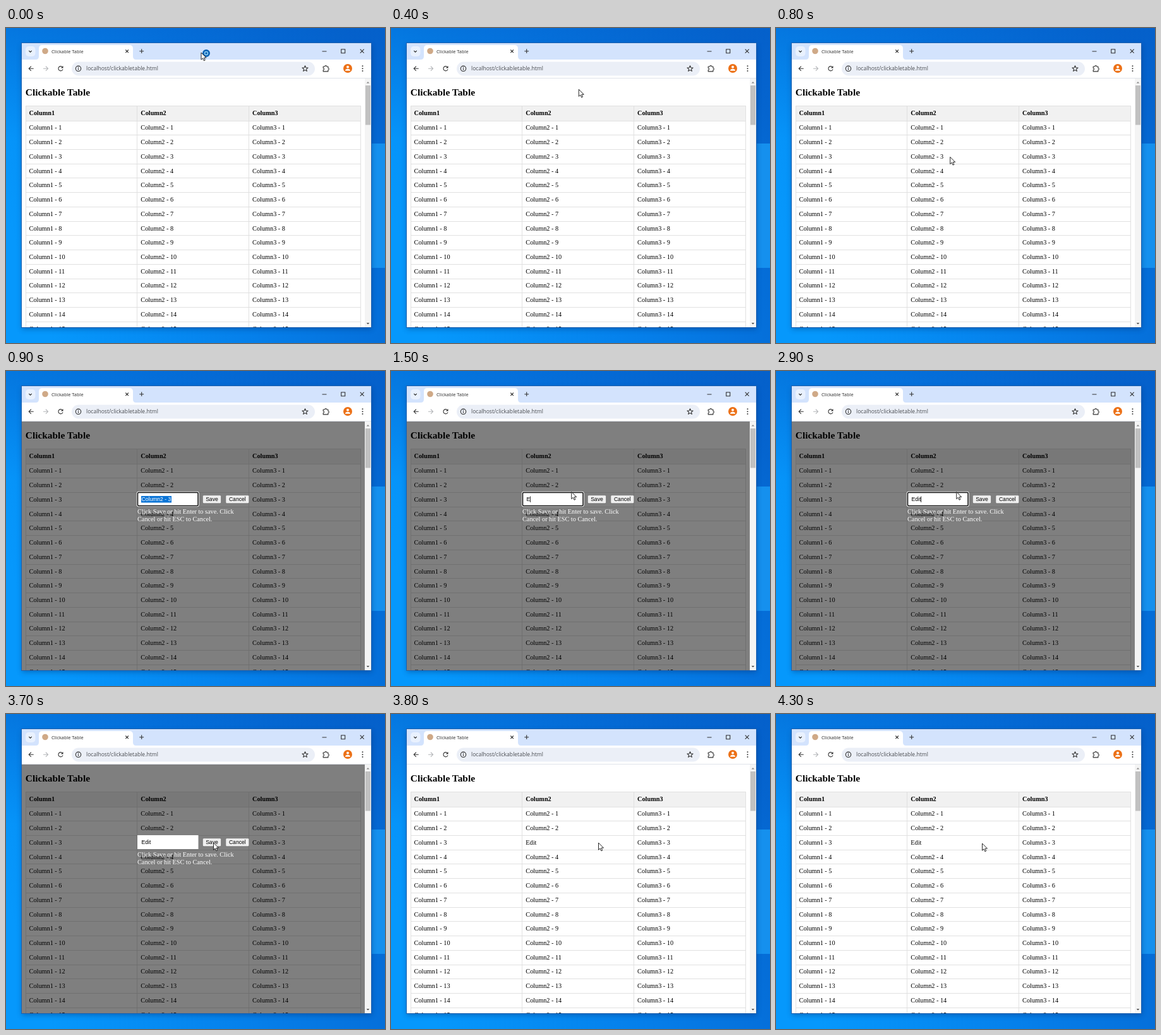
Recreate the animation shown at these times as an HTML page. Size 600 by 499 pixels, loop 4400 ms.

```html
<!DOCTYPE html>
<html lang="en">
<head>
<meta charset="utf-8">
<title>Clickable Table</title>
<style>
html, body { margin: 0; width: 100%; height: 100%; overflow: hidden; }
svg { display: block; width: 100vw; height: 100vh; }
text { white-space: pre; }
.ui { font-family: "Open Sans", sans-serif; }
.serif { font-family: "Liberation Serif", serif; font-size: 10.25px; }
.form { font-family: "Liberation Sans", sans-serif; font-size: 8.6px; }
.icon { fill: none; stroke: #333; stroke-width: 1.1; }
</style>
</head>
<body>
<svg viewBox="0 0 600 499" preserveAspectRatio="none">
  <defs>
    <linearGradient id="sky" x1="0" y1="0.6" x2="1" y2="0.3">
      <stop offset="0" stop-color="#0698fc"/>
      <stop offset="0.5" stop-color="#057fea"/>
      <stop offset="1" stop-color="#0566d0"/>
    </linearGradient>
    <linearGradient id="dim" x1="0" y1="0" x2="0" y2="1">
      <stop offset="0" stop-color="#0459c4" stop-opacity="0.45"/>
      <stop offset="0.35" stop-color="#0459c4" stop-opacity="0"/>
    </linearGradient>
    <filter id="soft" x="-10%" y="-10%" width="120%" height="120%">
      <feGaussianBlur stdDeviation="4"/>
    </filter>
    <clipPath id="view"><rect x="25" y="80" width="543" height="394"/></clipPath>
  </defs>

  <rect width="600" height="499" fill="url(#sky)"/>
  <rect width="600" height="499" fill="url(#dim)"/>
  <rect x="403" y="183" width="197" height="197" fill="#1590ee"/>
  <rect x="25" y="27" width="554" height="450" fill="#012a66" opacity="0.4" filter="url(#soft)"/>

  <!-- browser frame -->
  <rect x="24.5" y="23.5" width="554" height="451" fill="#fff" stroke="#1c5fae" stroke-width="1"/>
  <rect x="25" y="24" width="553" height="26" fill="#d3e3fd"/>
  <rect x="31" y="29" width="15.5" height="16" rx="5" fill="#e9f1fe"/>
  <path class="icon" d="M36.3 36l2.2 2.2 2.2-2.2" stroke-width="1.3"/>
  <path d="M47 50q5 0 5-5v-12.500q0-5.500 5.500-5.500h138q5.500 0 5.500 5.500V45q0 5 5 5z" fill="#fff"/>
  <circle cx="62" cy="36.500" r="4.800" fill="#cfa987"/>
  <text class="ui" x="72" y="39.600" font-size="7.400" fill="#2a2a2a">Clickable Table</text>
  <path class="icon" d="M189.300 34.500l4.600 4.600m0-4.600l-4.600 4.600M211.300 36.700h6.800m-3.400-3.400v6.800"/>
  <path class="icon" d="M500.500 37h7M530.700 33.700h6v6h-6zM560.700 33.700l6 6m0-6l-6 6"/>

  <path class="icon" d="M43.700 64.300h-7.400m3.500-3.600l-3.600 3.600 3.600 3.600" stroke-width="1.200"/>
  <path class="icon" d="M59 64.300h7.400m-3.500-3.600l3.600 3.600-3.600 3.600" style="stroke:#b3b5b8"/>
  <path class="icon" d="M89.400 62a3.600 3.600 0 1 0 .6 3.300" stroke-width="1.200"/>
  <path d="M90.500 60v3.600h-3.600z" fill="#333"/>
  <rect x="104" y="53.500" width="385" height="22" rx="11" fill="#ebeff7"/>
  <circle class="icon" cx="114.500" cy="64.300" r="4.200"/>
  <path class="icon" d="M114.500 63.700v2.900m0-4.800v1.100"/>
  <text class="ui" x="127" y="67.300" font-size="8.590" fill="#4a4d52">localhost/clickabletable.html</text>
  <path id="star" class="icon" stroke-linejoin="round"/>
  <path class="icon" d="M502.200 61h2.600a1.400 1.400 0 0 1 2.800 0h2.300v2.500a1.400 1.400 0 0 1 0 2.800v2.600h-7.700v-2.600a1.400 1.400 0 0 0 0-2.800z" stroke-linejoin="round"/>
  <circle cx="541" cy="64" r="7" fill="#ec7016"/>
  <circle cx="541" cy="61.800" r="2" fill="#fff"/>
  <path d="M537 67.700a4 3 0 0 1 8 0z" fill="#fff"/>
  <g fill="#333">
    <circle cx="564.500" cy="60.300" r="1"/><circle cx="564.500" cy="64.200" r="1"/><circle cx="564.500" cy="68.100" r="1"/>
  </g>
  <path d="M25 79.500h553" stroke="#dfe3ea"/>

  <!-- page -->
  <g clip-path="url(#view)">
    <g id="page" class="serif" fill="#000">
      <text x="30.800" y="106.700" font-size="15.400" font-weight="700" style="font-size:15.4px">Clickable Table</text>
    </g>
    <g id="dialog">
      <rect x="25" y="80" width="543" height="394" fill="#000" opacity="0.5"/>
      <rect x="208" y="192" width="96.500" height="22" fill="#fff"/>
      <g id="ring" fill="none">
        <rect x="207.300" y="191.300" width="97.900" height="23.400" rx="2" stroke="#fff" stroke-width="1"/>
        <rect x="208.500" y="192.500" width="95.500" height="21" rx="1.500" stroke="#101010" stroke-width="1.500"/>
      </g>
      <rect id="mark" x="214" y="198" width="48" height="10.500" fill="#0a74d6"/>
      <g class="form">
        <text id="field" x="214.500" y="206.200"></text>
        <rect id="caret" y="198.500" width="0.800" height="9.500"/>
        <g id="buttons"></g>
      </g>
      <g class="serif" fill="#fff">
        <text x="208" y="226.300">Click Save or hit Enter to save. Click</text>
        <text x="208" y="237.800">Cancel or hit ESC to Cancel.</text>
      </g>
    </g>
  </g>
  <rect x="568" y="80" width="10" height="394" fill="#f4f4f4"/>
  <rect x="569" y="91" width="8" height="62.500" fill="#c1c1c1"/>
  <path d="M570.700 87.500h4.600l-2.300-2.600z" fill="#8a8a8a"/>
  <path d="M570.700 467h4.600l-2.300 2.600z" fill="#505050"/>

  <g id="cursor">
    <g id="busy">
      <circle cx="8" cy="1" r="4.600" fill="#8fd0f5" stroke="#0d63b4" stroke-width="2.800"/>
      <circle cx="8" cy="1" r="1.800" fill="#0d63b4"/>
    </g>
    <path d="M0 0v11.200l2.600-2.400 1.700 4 1.900-.8-1.700-3.900h3.500z" fill="#fff" stroke="#111" stroke-width="0.900" stroke-linejoin="round"/>
  </g>
</svg>
<script>
const $ = id => document.getElementById(id);
const LOOP = 4400, STEP = 100;

function add(parent, tag, attrs, label) {
  const el = document.createElementNS("http://www.w3.org/2000/svg", tag);
  for (const k in attrs) el.setAttribute(k, attrs[k]);
  if (label) el.textContent = label;
  parent.appendChild(el);
  return el;
}

function buildTable() {
  const page = $("page"), cols = [31, 207.7, 384.5], rowH = 22.74;
  let editable;
  add(page, "rect", { x: 31, y: 124, width: 531, height: 23, fill: "#f1f1f1" });
  let grid = "M31.5 123.500V480M207.5 123.500V480M384.5 123.500V480M561.5 123.500V480M31 123.500H562";
  for (let r = 0; r <= 14; r++) grid += `M31 ${Math.round(146.5 + r * rowH) + 0.5}H562`;
  add(page, "path", { d: grid, fill: "none", stroke: "#dedede", "stroke-width": 0.9 });
  cols.forEach((x, c) => {
    const name = `Column${c + 1}`;
    add(page, "text", { x: x + 5.6, y: 138.4, "font-weight": 700 }, name);
    for (let r = 1; r <= 15; r++) {
      const cell = add(page, "text", { x: x + 5.6, y: 138.6 + r * rowH }, `${name} - ${r}`);
      if (c === 1 && r === 3) editable = cell;
    }
  });
  return editable;
}

function addButton(x, w, label) {
  add($("buttons"), "rect", { x, y: 196.8, width: w, height: 13, rx: 1.8, fill: "#efefef", stroke: "#6b6b6b", "stroke-width": 0.7 });
  add($("buttons"), "text", { x: x + w / 2, y: 206.2, "text-anchor": "middle" }, label);
}

const star = Array.from({ length: 10 }, (_, i) => {
  const r = i % 2 ? 2.1 : 4.8, a = i * Math.PI / 5;
  return `${473.5 + r * Math.sin(a)} ${64.5 - r * Math.cos(a)}`;
});
$("star").setAttribute("d", `M${star.join("L")}z`);
const cell = buildTable();
addButton(311.3, 29.3, "Save");
addButton(347.8, 37, "Cancel");

// [start, end, x, y]: glide to the point between the two times
const moves = [
  [200, 700, 275.7, 204.3],
  [900, 1200, 285.7, 191.5],
  [3000, 3500, 328.5, 204],
  [3800, 4100, 326.5, 205]
];
// [time, typed text, caret x]
const keys = [
  [1400, "E", 220.2],
  [1900, "Ed", 225],
  [2200, "Edi", 226.9],
  [2500, "Edit", 229.3]
];

function pointer(t) {
  let x = 309, y = 39;
  for (const [from, to, nx, ny] of moves) {
    const p = Math.min(1, Math.max(0, (t - from) / (to - from)));
    const e = p * p * (3 - 2 * p);
    x += (nx - x) * e;
    y += (ny - y) * e;
  }
  return `translate(${x} ${y})`;
}

const show = (id, on) => $(id).setAttribute("visibility", on ? "inherit" : "hidden");

function draw(t) {
  const key = keys.filter(k => k[0] <= t).pop();
  const focus = t < 3700;
  $("dialog").setAttribute("visibility", t >= 900 && t < 3800 ? "visible" : "hidden");
  show("ring", focus);
  show("mark", !key);
  show("caret", key && focus && (t - key[0]) % 1000 < 500);
  $("field").textContent = key ? key[1] : "Column2 - 3";
  $("field").setAttribute("fill", key ? "#000" : "#fff");
  if (key) $("caret").setAttribute("x", key[2]);
  cell.textContent = t >= 3800 ? "Edit" : "Column2 - 3";
  $("cursor").setAttribute("transform", pointer(t));
  show("cursor", t < 900 || t >= 1000);
  show("busy", t < 300);
}

const begin = performance.now();
function tick() {
  const t = (performance.now() - begin) % LOOP;
  draw(Math.floor(t / STEP) * STEP);
  requestAnimationFrame(tick);
}
tick();
</script>
</body>
</html>
```
